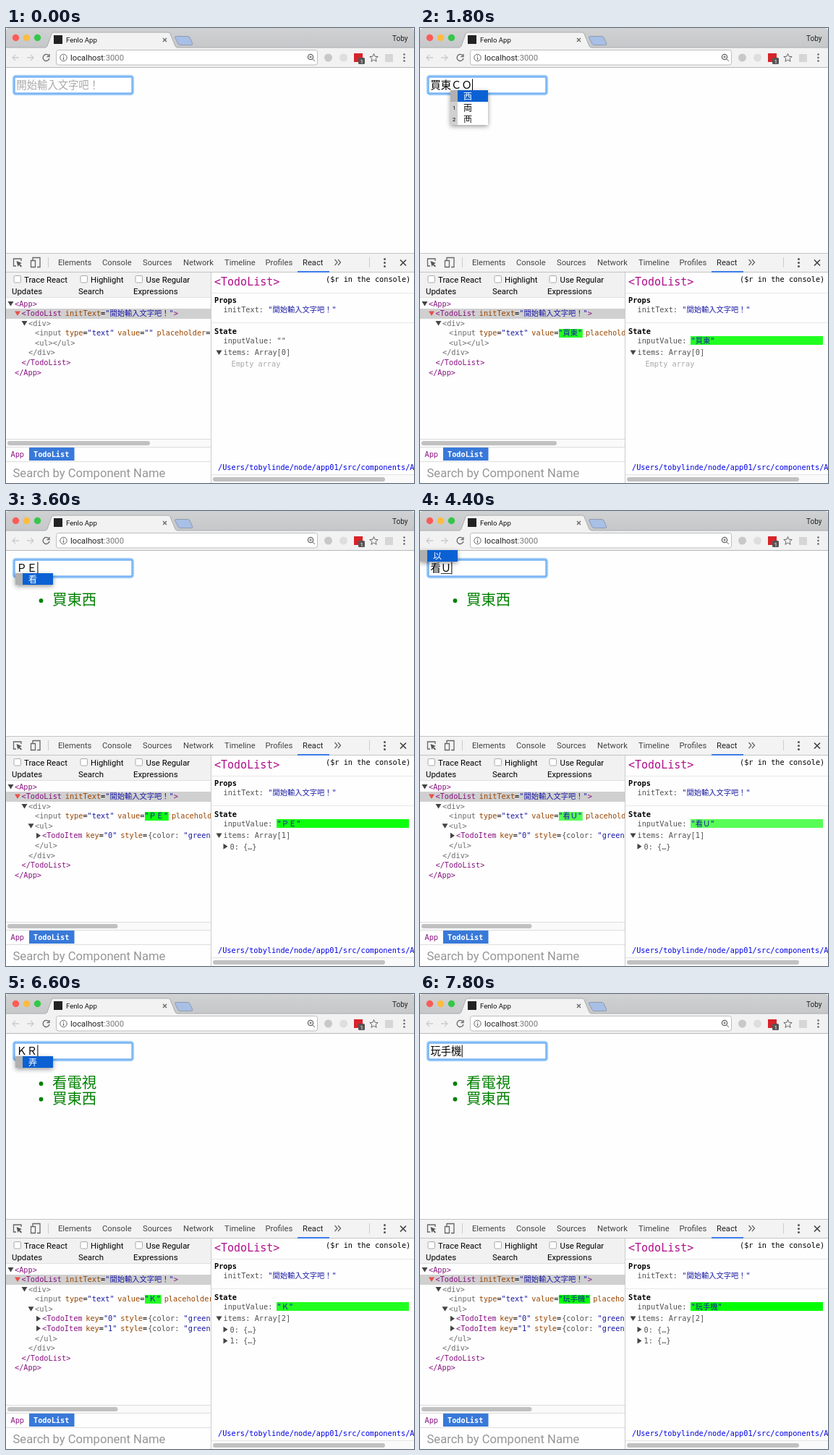
An HTML page for the animation above (8000 ms loop, 564 px wide and 629 px high).

```html
<!DOCTYPE html>
<html lang="zh-Hant">
<head>
<meta charset="utf-8">
<title>Todo list</title>
<style>
html, body { margin: 0; width: 100%; height: 100%; overflow: hidden; background: #fff; }
svg { display: block; width: 564px; height: 629px; }
text { white-space: pre; font-family: Roboto, "Noto Sans CJK TC", "Noto Sans CJK JP", "Noto Sans CJK", sans-serif; }
.mono text, text.mono { font: 10.25px "DejaVu Sans Mono", "Noto Sans CJK TC", "Noto Sans CJK JP", "Noto Sans CJK", monospace; }
.tabs text { font-size: 11.2px; fill: #444; }
.checks text { font-size: 11.4px; fill: #000; }
.checks rect { fill: #fff; stroke: #aaa; }
.tag { fill: #881280; }
.dom { fill: #6c6c6c; }
.attr { fill: #994500; }
.str { fill: #1a1aa6; }
.key { fill: #505050; }
.mono text.bold { font-weight: bold; }
.mono text.head { font-size: 15px; fill: #b0108c; }
.field { font-size: 14.3px; }
.item { font-size: 20.4px; fill: #008000; }
.line { fill: none; stroke: #666; stroke-width: 1.3; }
.pale { stroke: #ccc; }
.popup { filter: drop-shadow(0 2px 3px #0006); }
</style>
</head>
<body>
<svg viewBox="0 0 564 629">
  <defs>
    <linearGradient id="strip" x2="0" y2="1"><stop stop-color="#d0d1d2"/><stop offset="1" stop-color="#c5c7c9"/></linearGradient>
    <clipPath id="left"><rect y="338" width="283" height="231"/></clipPath>
    <clipPath id="window"><rect width="564" height="629" rx="4"/></clipPath>
  </defs>
  <g clip-path="url(#window)">
  <rect width="564" height="629" fill="#fefefe"/>

  <!-- browser frame -->
  <rect width="564" height="28" fill="url(#strip)"/>
  <rect y="27" width="564" height="27" fill="#f2f2f2"/>
  <path d="M0 27H54Q56 27 57 25L63 8Q64 6 66 6H224Q226 6 227 8L234 25Q235 27 237 27H564" fill="#f2f2f2" stroke="#a9abad"/>
  <path d="M0 54.5H564" stroke="#b8b8b8"/>
  <circle cx="13.5" cy="13.5" r="4.7" fill="#fc5b57"/>
  <circle cx="28.5" cy="13.5" r="4.7" fill="#fdbc40"/>
  <circle cx="43.5" cy="13.5" r="4.7" fill="#34c748"/>
  <rect x="66" y="10" width="12" height="12" fill="#222"/>
  <text x="83" y="20" font-size="9.6" fill="#111">Fenlo App</text>
  <path class="line" d="M217 14l5 5m0-5l-5 5"/>
  <path d="M235 11.5H251Q253 11.5 254 13L258 22Q258 23.5 256 23.5H241Q239 23.5 238 22L233.5 13Q233.5 11.5 235 11.5Z" fill="#a8bfe6" stroke="#8f9bb0"/>
  <text x="534" y="17.5" font-size="10" fill="#222">Toby</text>
  <path class="line pale" d="M18 41H9m4-4l-4 4 4 4M29 41h9m-4-4l4 4-4 4"/>
  <path class="line" d="M59 38A4.5 4.5 0 1 0 60 42M60 36v3.5h-3.5"/>
  <rect x="69.5" y="30.5" width="361" height="20.5" rx="3" fill="#fff" stroke="#bdbdbd"/>
  <circle class="line" cx="79.5" cy="41" r="4.7" style="stroke-width:1"/>
  <path class="line" d="M79.5 40.5v3.5M79.5 38v1.2"/>
  <text x="89" y="45" font-size="11.25" fill="#222">localhost<tspan fill="#777">:3000</tspan></text>
  <circle class="line" cx="421" cy="40" r="3.6"/>
  <path class="line" d="M424 43l3 3M419.3 40h3.4M421 38.3v3.4" style="stroke-width:1"/>
  <circle cx="445.5" cy="41" r="5.5" fill="#c8c8c8"/>
  <circle cx="466.5" cy="41" r="5.5" fill="#dedede"/>
  <rect x="481" y="35" width="12" height="12" fill="#d8232a"/>
  <rect x="487" y="41" width="9" height="9" rx="1.5" fill="#555"/>
  <text x="489.5" y="48.5" font-size="8" fill="#fff">1</text>
  <path class="line" style="stroke-width:1" d="M508.5 35.5l1.6 3.8 4.1.3-3.1 2.7 1 4-3.6-2.2-3.6 2.2 1-4-3.1-2.7 4.1-.3Z"/>
  <rect x="524" y="36" width="11" height="11" fill="#d6d6d6"/>
  <g fill="#666"><circle cx="550.5" cy="36.5" r="1.3"/><circle cx="550.5" cy="41" r="1.3"/><circle cx="550.5" cy="45.5" r="1.3"/></g>

  <!-- page -->
  <rect x="10" y="66" width="166" height="26" rx="3.5" fill="#fff" stroke="#b0d4fa" stroke-width="2.4"/>
  <rect x="11.5" y="67.5" width="163" height="23" rx="2" fill="#fff" stroke="#78b5f4" stroke-width="2.4"/>
  <g id="page"></g>

  <!-- devtools frame -->
  <rect y="311" width="564" height="27" fill="#f3f3f3"/>
  <path d="M0 311.5H564M0 337.5H564" stroke="#c4c4c4"/>
  <path class="line" d="M14 329h-3.5v-10H21v3"/>
  <path d="M14.5 322l7.5 3-3 1.2 3 3-1.3 1.3-3-3-1.2 2.8Z" fill="#555"/>
  <path class="line" d="M37 321v-3.5h10v13h-4M34.5 321.5h6v9h-6Z"/>
  <path d="M58.5 317v14M502.5 317v14" stroke="#ccc"/>
  <g class="tabs">
    <text x="72" y="328">Elements</text><text x="133" y="328">Console</text>
    <text x="189" y="328">Sources</text><text x="245" y="328">Network</text>
    <text x="302" y="328">Timeline</text><text x="358.5" y="328">Profiles</text>
    <text x="410" y="328" style="fill:#222">React</text>
  </g>
  <rect x="403" y="336" width="44" height="2" fill="#3b7de9"/>
  <path class="line" d="M454.5 320l3.5 4-3.5 4M459 320l3.5 4-3.5 4"/>
  <g fill="#555"><circle cx="523.5" cy="319.5" r="1.5"/><circle cx="523.5" cy="324.5" r="1.5"/><circle cx="523.5" cy="329.5" r="1.5"/></g>
  <path class="line" d="M545 320.5l8 8m0-8l-8 8" style="stroke:#444;stroke-width:1.7"/>

  <!-- component tree -->
  <rect y="338" width="283" height="35" fill="#f1f1f1"/>
  <path d="M0 372.5H283" stroke="#e0e0e0"/>
  <g class="checks">
    <rect x="11" y="342.5" width="9.5" height="9.5" rx="1.5"/><text x="25" y="352">Trace React</text><text x="8" y="368">Updates</text>
    <rect x="103" y="342.5" width="9.5" height="9.5" rx="1.5"/><text x="117" y="352">Highlight</text><text x="100" y="368">Search</text>
    <rect x="179" y="342.5" width="9.5" height="9.5" rx="1.5"/><text x="193.5" y="352">Use Regular</text><text x="176" y="368">Expressions</text>
  </g>
  <rect y="388" width="283" height="14" fill="#d0d0d0"/>
  <g id="tree" class="mono" clip-path="url(#left)"></g>
  <rect y="569" width="283" height="10" fill="#fafafa"/>
  <path d="M0 568.5H283M0 579.5H283M0 599.5H283" stroke="#ddd"/>
  <rect id="thumb" x="2" y="571" height="6" rx="3" fill="#c1c1c1"/>
  <rect x="32" y="580" width="62.5" height="18" fill="#3879d9"/>
  <g class="mono">
    <text x="6.5" y="593" class="tag">App</text>
    <text x="38" y="593" class="bold" fill="#fff">TodoList</text>
  </g>
  <text x="9.5" y="620.5" font-size="16.6" fill="#969696">Search by Component Name</text>

  <!-- details -->
  <path d="M283.5 338V629" stroke="#ccc"/>
  <path d="M284 366.5H564M284 407.5H564" stroke="#e8e8e8"/>
  <g class="mono">
    <text x="288" y="356" class="head">&lt;TodoList&gt;</text>
    <text x="442" y="351">($r in the console)</text>
    <text x="288" y="380" class="bold">Props</text>
    <text x="300.5" y="393" class="key">initText: <tspan class="str">"開始輸入文字吧！"</tspan></text>
    <text x="288" y="422.5" class="bold">State</text>
    <g id="state"></g>
    <text x="293" y="611" fill="#0000e6">/Users/tobylinde/node/app01/src/components/A</text>
  </g>
  <rect x="284" y="618" width="280" height="11" fill="#fafafa"/>
  <path d="M284 617.5H564" stroke="#e4e4e4"/>
  <rect x="286" y="621" width="238" height="6" rx="3" fill="#c1c1c1"/>
  </g>
</svg>
<script>
const LOOP = 8000, STEP = 200, LAG = 130, FADE = 1000;
const GLYPH = 14.3, MONO = 10.25, CELL = MONO * 0.602;
const $ = id => document.getElementById(id);

// time, committed text, letters being composed, candidates
const typing = [
  [-9999, '', ''],
  [180, '', 'Ｃ', '四'], [450, '', 'ＣＥ', '罵'], [750, '', 'ＣＥＢ', '買'], [950, '買', ''],
  [1150, '買', 'Ｆ', '下'], [1350, '買', 'ＦＴ', '東'], [1550, '買東', ''],
  [1750, '買東', 'ＣＯ', '西両襾'], [1950, '買東西', ''], [2120, '', ''],
  [3150, '', 'Ｐ', '手'], [3400, '', 'ＰＥ', '看'], [3750, '看', ''],
  [4050, '看', 'Ｕ', '以'], [4450, '看', 'ＵＥ', '電'], [4750, '看電', ''],
  [4950, '看電', 'Ｒ'], [5150, '看電', 'ＲＲ', '視'], [5380, '看電視', ''], [5850, '', ''],
  [6350, '', 'Ｋ', '王'], [6550, '', 'ＫＲ', '弄'], [6780, '玩', ''],
  [6950, '玩', 'Ｐ', '手'], [7250, '玩手', ''],
  [7420, '玩手', 'ＴＪ'], [7660, '玩手機', '']
];
const added = [[2120, '買東西'], [5850, '看電視']];

const latest = t => typing.filter(e => e[0] <= t).pop();
const span = (cls, s, dx = 0) => `<tspan class="${cls}" dx="${dx}">${s.replace(/</g, '&lt;')}</tspan>`;
const text = (x, y, body, cls = '') => `<text x="${x}" y="${y}" class="${cls}">${body}</text>`;
const rect = (x, y, w, h, fill) => `<rect x="${x}" y="${y}" width="${w}" height="${h}" fill="${fill}"/>`;
const arrow = (x, y, open, fill = '#444') =>
  `<path d="M${x} ${y}${open ? 'm-4-3h8l-4 6.5Z' : 'm-2.5-4v8l6-4Z'}" fill="${fill}"/>`;
const attr = (name, value, dx = 4.7) => span('attr', name, dx) + span('', '=') + span('str', value);

// the CSS "ease" curve, solved by bisection
function ease(x) {
  const bez = (a, b, u) => 3 * a * u * (1 - u) ** 2 + 3 * b * u * u * (1 - u) + u ** 3;
  let lo = 0, hi = 1;
  for (let i = 0; i < 20; i++) {
    const mid = (lo + hi) / 2;
    if (bez(0.25, 0.25, mid) < x) lo = mid; else hi = mid;
  }
  return bez(0.1, 1, lo);
}

function popup(x, y, list) {
  const rows = [...list].map((c, i) => {
    const top = y + i * 16;
    return rect(x, top, 10, 16, i ? '#d0d0d0' : '#b0b0b0') + rect(x + 10, top, 42, 16, i ? '#fff' : '#0b61d3') +
      (i ? `<text x="${x + 3}" y="${top + 11}" font-size="7.5">${i}</text>` : '') +
      `<text x="${x + 18}" y="${top + 12.5}" font-size="12" fill="${i ? '#000' : '#fff'}">${c}</text>`;
  });
  return `<g class="popup">${rows.join('')}</g>`;
}

function drawPage([, done, letters, list], items) {
  const start = 14.5 + done.length * GLYPH, end = start + letters.length * GLYPH;
  let out = items.map((s, i) =>
    `<circle cx="48.5" cy="${124 + i * 21.5}" r="2.9" fill="#008000"/>` + text(64, 130 + i * 21.5, s, 'item')).join('');
  if (done + letters) {
    out += text(14.5, 84, done + letters, 'field') + rect(end + 0.3, 70.5, 1, 17, '#000');
    if (letters) out += rect(start, 86, end - start, 1, '#333');
  } else {
    out += `<text x="14.5" y="84" class="field" fill="#a9a9a9">開始輸入文字吧！</text>`;
  }
  const above = items.length && done.length === 1;
  if (list) out += above ? popup(0, 54, list) : popup(Math.floor(start - 0.8), 86, list);
  $('page').innerHTML = out;
}

function drawTree(value, flash, count) {
  let row = 0, out = '';
  const add = (x, body, open, color) => {
    const y = 381 + row++ * 13.55;
    if (open !== undefined) out += arrow(x - 5.5, y, open, color);
    out += text(x, y + 3.7, body);
  };
  add(12, span('tag', '<App>'), true);
  add(21.5, span('tag', '<TodoList') + attr('initText', '"開始輸入文字吧！"') + span('tag', '>'), true, '#e8504a');
  add(31, span('dom', '<div>'), true);
  out += rect(192, 416, 2 * CELL + value.length * MONO, 12, flash);
  add(40, span('dom', '<input') + attr('type', '"text"') + attr('value', `"${value}"`) + attr('placeholder', '"'));
  if (count) {
    add(40, span('dom', '<ul>'), true);
    for (let i = 0; i < count; i++)
      add(50, span('tag', '<TodoItem') + attr('key', `"${i}"`) + span('attr', 'style', 4.7) +
        span('', '=') + span('key', '{color: ', 1) + span('str', '"green"'), false);
    add(40, span('dom', '</ul>'));
  } else {
    add(40, span('dom', '<ul></ul>'));
  }
  add(31, span('dom', '</div>'));
  add(21.5, span('tag', '</TodoList>'));
  add(12, span('tag', '</App>'));
  $('tree').innerHTML = out;
  $('thumb').setAttribute('width', count ? 152.5 : 197 - 5 * value.length);
}

function drawState(value, flash, count) {
  let out = rect(374, 426, 183, 12, flash) +
    text(300.5, 436, span('key', 'inputValue: ') + span(value ? 'str' : 'key', `"${value}"`)) +
    arrow(294.5, 448.5, true) + text(300.5, 452, `items: Array[${count}]`, 'key');
  if (!count) out += `<text x="311.5" y="468" fill="#aaa">Empty array</text>`;
  for (let i = 0; i < count; i++) {
    const y = 467.5 + i * 15.7;
    out += arrow(303, y - 3.7, false) + text(309.5, y, `${i}: {…}`, 'key');
  }
  $('state').innerHTML = out;
}

let shown = -1;
function tick(now) {
  const t = Math.floor(now % LOOP / STEP) * STEP;
  if (t !== shown) {
    shown = t;
    const items = added.filter(e => e[0] <= t).map(e => e[1]).reverse();
    const [since, done, letters] = latest(t - LAG);
    const age = Math.min(1, (t - since - LAG) / FADE);
    const flash = `rgba(0,255,0,${(1 - ease(age)).toFixed(3)})`;
    drawPage(latest(t), items);
    drawTree(done + letters, flash, items.length);
    drawState(done + letters, flash, items.length);
  }
  requestAnimationFrame(tick);
}
tick(0);
</script>
</body>
</html>
```
